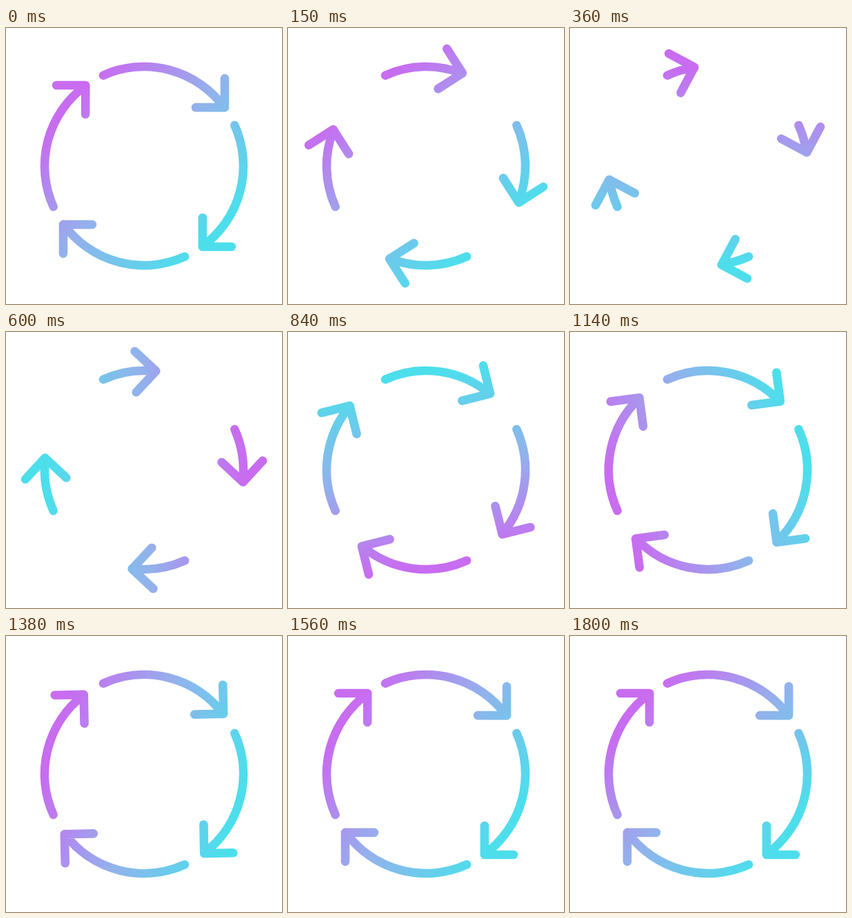
An HTML page with a canvas for the animation above (3830 ms loop, 400 by 400 pixels).

```html
<!DOCTYPE html>
<html lang="en">
<head>
<meta charset="utf-8">
<title>Cycle arrows</title>
<style>
  html, body { margin: 0; width: 100%; height: 100%; overflow: hidden; background: #fff; }
  canvas { display: block; width: 400px; height: 400px; }
</style>
</head>
<body>
<canvas id="stage"></canvas>
<script>
const LOOP = 3830, ACTIVE = 1800, STEP = 30;
const RADIUS = 144, TAIL = -24.2, REST = 54, LEG = 42;
const SIZE = 400, REACH = 138;
const rad = deg => deg * Math.PI / 180;

const canvas = document.getElementById('stage');
const ctx = canvas.getContext('2d');
const ratio = window.devicePixelRatio || 1;
canvas.width = canvas.height = SIZE * ratio;

// Cubic easing with control points (x1, 0) and (x2, 1)
function ease(x1, x2) {
  return x => {
    let low = 0, high = 1;
    for (let i = 0; i < 24; i++) {
      const s = (low + high) / 2, r = 1 - s;
      if (3 * r * r * s * x1 + 3 * r * s * s * x2 + s ** 3 < x) low = s;
      else high = s;
    }
    return low * low * (3 - 2 * low);
  };
}

const smooth = ease(1 / 3, 2 / 3);
const snap = ease(0.33, 0.33);
const turn = ease(0.3, 0.44);

// Arc length in degrees: shrink, spring out, settle
const phases = [
  { start: 0, end: 390, from: 78.2, to: 16, curve: snap },
  { start: 430, end: 900, from: 16, to: 66.5, curve: smooth },
  { start: 900, end: 1500, from: 66.5, to: 78.2, curve: smooth }
];

function spanAt(time) {
  const { start, end, from, to, curve } = phases.filter(p => p.start <= time).pop();
  const x = Math.min((time - start) / (end - start), 1);
  return x === 1 ? to : from + (to - from) * curve(x);
}

function gradientAt(time) {
  const angle = rad(222 + 360 * turn(Math.min(time / ACTIVE, 1)));
  const x = REACH * Math.cos(angle), y = REACH * Math.sin(angle);
  const gradient = ctx.createLinearGradient(x, y, -x, -y);
  gradient.addColorStop(0, '#c86cf0');
  gradient.addColorStop(0.5, '#92b2ec');
  gradient.addColorStop(1, '#4ddeec');
  return gradient;
}

function traceArrow(span) {
  const tip = TAIL + span;
  ctx.moveTo(RADIUS * Math.sin(rad(TAIL)), -RADIUS * Math.cos(rad(TAIL)));
  ctx.arc(0, 0, RADIUS, rad(TAIL - 90), rad(tip - 90));
  ctx.save();
  ctx.rotate(rad(tip - REST));
  const x = RADIUS * Math.sin(rad(REST)) + 0.5;
  const y = -RADIUS * Math.cos(rad(REST)) - 0.2;
  ctx.moveTo(x, y - LEG);
  ctx.lineTo(x, y);
  ctx.lineTo(x - LEG, y);
  ctx.restore();
}

function draw(time) {
  ctx.setTransform(ratio, 0, 0, ratio, 0, 0);
  ctx.fillStyle = '#fff';
  ctx.fillRect(0, 0, SIZE, SIZE);
  ctx.translate(SIZE / 2, SIZE / 2);
  ctx.lineWidth = 12.6;
  ctx.lineCap = ctx.lineJoin = 'round';

  const span = spanAt(time);
  ctx.beginPath();
  for (let i = 0; i < 4; i++) {
    ctx.save();
    ctx.rotate(i * Math.PI / 2);
    traceArrow(span);
    ctx.restore();
  }
  ctx.strokeStyle = gradientAt(time);
  ctx.stroke();
}

const began = performance.now();
function tick() {
  const time = (performance.now() - began) % LOOP;
  draw(Math.min(Math.floor(time / STEP) * STEP, ACTIVE));
  requestAnimationFrame(tick);
}
tick();
</script>
</body>
</html>
```
